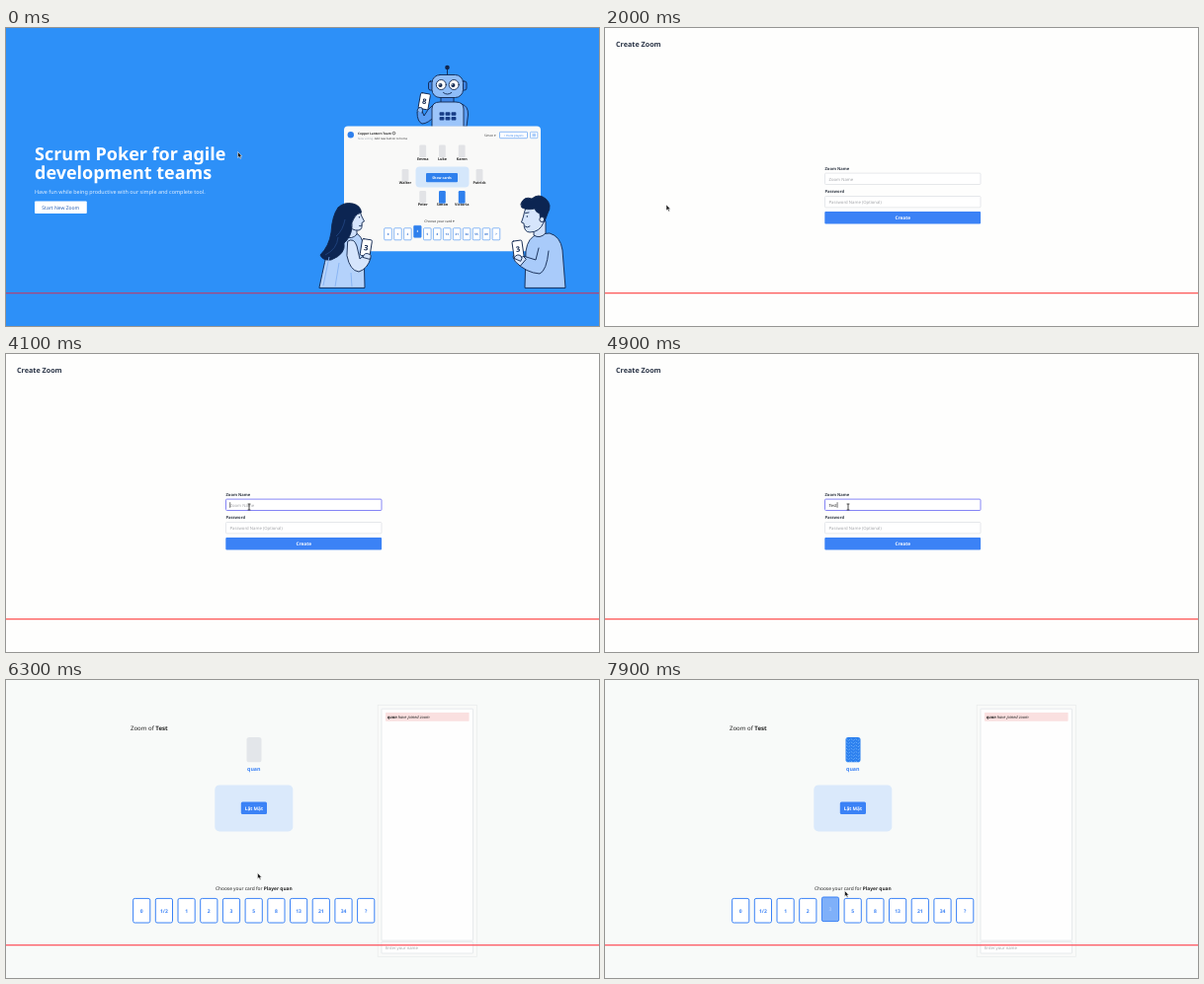
Animation of 600 by 302 pixels, one loop 8000 ms. Source, as an HTML page:

```html
<!DOCTYPE html>
<html lang="en">
<head>
<meta charset="utf-8">
<title>Scrum Poker</title>
<style>
  html, body { margin: 0; width: 100%; height: 100%; overflow: hidden; background: #fefefd; }
  svg { display: block; width: 100vw; height: 100vh; }
  text { font-family: "Noto Sans", "Open Sans", sans-serif; text-rendering: geometricPrecision; white-space: pre; }
  .b { font-weight: 700; }
  .s { font-weight: 600; }
  .m { text-anchor: middle; }
  .ink { stroke: #10264f; stroke-width: .9; stroke-linejoin: round; stroke-linecap: round; }
</style>
</head>
<body>
<svg id="stage" viewBox="0 0 600 302" preserveAspectRatio="none" xmlns="http://www.w3.org/2000/svg"></svg>
<script>
const BLUE = '#3b82f6', NAVY = '#10264f';
const LOOP = 8000, STEP = 100;

const rect = (x, y, w, h, r, fill, more = '') =>
  `<rect x="${x}" y="${y}" width="${w}" height="${h}" rx="${r}" fill="${fill}" ${more}/>`;
const text = (x, y, size, fill, str, cls = '', more = '') =>
  `<text x="${x}" y="${y}" font-size="${size}" fill="${fill}" class="${cls}" ${more}>${str}</text>`;
const path = (d, fill, cls = 'ink', more = '') => `<path d="${d}" fill="${fill}" class="${cls}" ${more}/>`;
const circle = (x, y, r, fill, cls = '') => `<circle cx="${x}" cy="${y}" r="${r}" fill="${fill}" class="${cls}"/>`;
const line = (color) => rect(0, 268, 600, 1.3, 0, color);

// Landing page
function robot() {
  const pads = [0, 1, 2].map(i =>
    rect(438.6 + i * 6, 85.2, 4.8, 3.6, .8, '#173c86') + rect(438.6 + i * 6, 90, 4.8, 3.6, .8, '#173c86')).join('');
  return path('M446.5 48V42', 'none') + circle(446.5, 40, 2.3, NAVY) +
    path('M461 77Q468 79 467.5 88L466 100H458Z', '#5a9df3') +
    path('M432 78Q426 83 423 89L420.5 83L416 85Q416 95 421 97Q427 97 434 89Z', '#5a9df3') +
    rect(440, 68, 13, 8, 1, '#3f86e6', 'class="ink"') +
    path('M431 100V82Q431 75 439 75H455Q463 75 463 82V100Z', '#9cc5fa') + pads +
    rect(427.5, 54, 5, 9, 2, '#3f86e6', 'class="ink"') + rect(461, 54, 5, 9, 2, '#3f86e6', 'class="ink"') +
    rect(431, 47.5, 31.5, 23, 8, '#8fbdf8', 'class="ink"') +
    [440.3, 453.2].map(x => circle(x, 57.5, 5, '#fff', 'ink') + circle(x - .8, 58, 2, NAVY) + circle(x - 1.4, 57.2, .6, '#fff')).join('') +
    path('M442.5 65.5Q446.5 68.8 450.8 65.5', 'none') +
    card(423.3, 74.2, 10, 16, 10, '8') + path('M416 84Q417 79 421 81Q422 83 421 86', '#8fbdf8');
}

const card = (x, y, w, h, turn, label) =>
  `<g transform="translate(${x} ${y}) rotate(${turn})">` +
  rect(-w / 2, -h / 2, w, h, 1.4, '#fff', 'class="ink"') + text(0, 2.7, 7.5, NAVY, label, 'b m') + '</g>';

function woman() {
  return path('M317 263Q323 234 327 219Q331 208 342 207H352Q361 210 362 222L363 263Z', '#b4d2fb') +
    path('M343 202L343 211Q350 215 355 209V200Z', '#cfe0fb') +
    path('M350 183Q359 184 359.5 190L362.5 196L360 197.5Q361 204 357 205Q350 206 346 199Z', '#d6e5fc') +
    path('M336 182Q342 176 351 178Q359 180 359.5 187Q354 188 352 193Q349 197 350 202Q349 212 342 218Q344 229 329 235Q320 236 318 230Q327 221 329 207Q330 190 336 182Z', '#0c2552') +
    path('M334 211Q341 205 343 194M323 230Q335 224 336 212', 'none', '', 'stroke="#2c5598" stroke-width=".6"') +
    circle(357.5, 191.7, .7, NAVY) + path('M357.5 200.5Q359 201.2 360 200', 'none') +
    path('M346 216Q352 212 355 221L358 234L365 228L369 233Q366 244 357 247Q348 246 345 231Z', '#d6e5fc') +
    path('M327 232L321 261M337 238L333 262M349 248L350 262', 'none', '', 'stroke="#7eaef2" stroke-width=".8"') +
    card(364.3, 222.6, 10, 17, 9, '3') + path('M361 232Q363 227 367 229Q371 230 368 234Z', '#d6e5fc');
}

function man() {
  return path('M525 263L526 226Q528 212 538 209L550 208Q561 211 563 225L566 263Z', '#a9cbfa') +
    path('M534 198V210Q540 214 546 208V196Z', '#cfe0fb') +
    path('M526 182Q524 188 523.5 191L521.5 197L524 198Q524 207 530 207Q540 207 544 197L545 180L533 177Z', '#d6e5fc') +
    path('M521 178Q524 170 532 173Q539 167 546 173Q553 179 548 188L545 196L541 196L540 188Q536 187 535 183Q527 185 522 182Z', '#0c2552') +
    circle(542.3, 194, 2.5, '#d6e5fc', 'ink') + circle(527.3, 191, .75, NAVY) +
    path('M525.5 187.6L529 187M525 201Q527.5 203 530 201', 'none') +
    path('M549 226Q547 246 540 249Q526 248 516 237L520 230L536 235L539 223', '#a9cbfa') +
    path('M526 234L520 228Q514 227 513 232Q514 237 520 241Z', '#d6e5fc') +
    card(518, 224, 10, 17, -8, '3') + path('M514 233Q517 228 521 231Q523 233 521 236Z', '#d6e5fc');
}

function board() {
  const seats = [
    [421.7, 118.5, 'Emma'], [441.4, 118.5, 'Luke'], [461.2, 118.5, 'Karen'],
    [404, 143, 'Walter'], [479, 143, 'Patrick'],
    [421.7, 165, 'Peter'], [441.4, 165, 'Simon', 1], [461.2, 165, 'Victoria', 1]];
  const hand = ['0', '1', '2', '3', '5', '8', '13', '21', '34', '55', '89', '?'];
  return rect(342, 99.5, 199, 126.7, 4, '#f9f9f8') + circle(348.8, 108.2, 3.2, '#2f80ed') +
    text(356, 107.8, 3.15, '#222', 'Copper Lantern Team', 'b') +
    `<circle cx="392.5" cy="106.6" r="1.3" fill="none" stroke="#333" stroke-width=".7"/>` +
    text(356, 112.6, 2.85, '#333', '<tspan fill="#9ba3ad">Now voting:</tspan> Add new button to home') +
    text(484, 109.6, 3.1, '#333', 'Simon ▾') +
    rect(499.5, 105.3, 28, 6.4, .8, '#fff', 'stroke="#3b8af0" stroke-width=".6"') +
    text(513.5, 109.5, 2.8, '#2f80ed', '+ Invite players', 'm') +
    rect(530.5, 105.3, 7.3, 6.4, .8, '#fff', 'stroke="#3b8af0" stroke-width=".5"') +
    path('M532.5 107.2H536M532.5 108.5H536M532.5 109.8H536', 'none', '', 'stroke="#3b8af0" stroke-width=".5"') +
    rect(414.5, 140.5, 54, 21, 4, '#d5e7fb') + rect(425, 147, 32, 9.2, 1, '#2f80ed') +
    text(441, 152.9, 3.5, '#fff', 'Show cards', 'b m') +
    seats.map(([x, y, name, voted]) => rect(x - 3.4, y, 6.8, 12.8, 1.2, voted ? '#2f80ed' : '#e2e3e6') +
      text(x, y + 15.3, 3.7, '#222', name, 's m')).join('') +
    text(438.5, 197, 3.4, '#333', 'Choose your card ▾', 'm') +
    hand.map((n, i) => {
      const on = i === 3, x = 386.5 + i * 9.95, y = on ? 200.3 : 202.8;
      return rect(x - 3.8, y, 7.6, 12, .9, on ? '#2f80ed' : '#fff', 'stroke="#3b8af0" stroke-width=".6"') +
        text(x, y + 7.1, 3, on ? '#fff' : '#2f6fd0', n, 's m');
    }).join('');
}

const landing = rect(0, 0, 600, 302, 0, '#2d90f8') +
  text(29, 134.3, 18, '#fff', 'Scrum Poker for agile', 'b') +
  text(29, 153.3, 18, '#fff', 'development teams', 'b') +
  text(29, 168.2, 5.45, '#e4f0fe', 'Have fun while being productive with our simple and complete tool.') +
  rect(29, 175.5, 52.8, 12.5, 1, '#fff', 'id="start"') +
  text(55.3, 183.5, 5, '#2b62b5', 'Start New Zoom', 'm') +
  robot() + board() + woman() + man() + line('#a8487e');

// Form page
const field = (id, y) => rect(222.5, y, 157.5, 11.4, 1, '#fff', `id="${id}" stroke="#dcdee2" stroke-width=".7"`);
const form = rect(0, 0, 600, 302, 0, '#fefefd') +
  text(11, 19.4, 7.2, '#2a3446', 'Create Zoom', 'b') +
  text(222.5, 144.1, 4.1, '#333b48', 'Zoom Name', 's') + field('name', 147.1) +
  text(226.5, 154.5, 4.25, '#a3a5a9', 'Zoom Name', '', 'id="hint"') +
  text(226.5, 154.5, 4.25, '#222', '', '', 'id="typed"') +
  rect(226.5, 150.2, .6, 5.6, 0, '#222', 'id="caret"') +
  text(222.5, 167.4, 4.1, '#333b48', 'Password', 's') + field('pass', 170.5) +
  text(226.5, 177.9, 4.25, '#a3a5a9', 'Password Name (Optional)') +
  rect(222.3, 186, 157.8, 12.5, 1, BLUE, 'id="create"') +
  text(301.2, 194, 4.75, '#fff', 'Create', 'b m') + line('#fd5a5a');

// Room page
const deck = ['0', '1/2', '1', '2', '3', '5', '8', '13', '21', '34', '?'];
let zigzag = '';
for (let i = 0; i < 8; i++) zigzag += `M244 ${59.5 + i * 3.2}l2.4 2l2.4 -2l2.4 2l2.4 -2l2.4 2l2.4 -2`;

const room = rect(0, 0, 600, 302, 0, '#f8faf9') +
  text(126, 50.5, 6.05, '#222', 'Zoom of <tspan class="b">Test</tspan>') +
  rect(243.5, 58, 15, 25.3, 2.6, '#e3e6ea', 'id="seat"') +
  `<clipPath id="clip">${rect(243.5, 58, 15, 25.3, 2.6, '#000')}</clipPath>` +
  path(zigzag, 'none', '', 'id="back" clip-path="url(#clip)" stroke="#74b4fb" stroke-width=".8" stroke-dasharray="2.2 .9"') +
  text(250.8, 92, 5.3, BLUE, 'quan', 'b m') +
  rect(211.3, 106.4, 79, 47, 4.5, '#dae9fb') + rect(237.8, 123.5, 26.2, 12.6, 1.5, BLUE) +
  text(250.9, 131.6, 4.75, '#fff', 'Lật Mặt', 'b m') +
  text(250.8, 212.7, 4.85, '#222', 'Choose your card for <tspan class="b">Player quan</tspan>', 'm') +
  deck.map((n, i) => {
    const x = 137.2 + i * 22.7;
    return `<g id="card${i}">` + rect(x - 8.6, 221.4, 17.2, 24.6, 1.7, '#fff', `stroke="${BLUE}" stroke-width="1"`) +
      text(x, 235.6, 5, BLUE, n, 'b m') + '</g>';
  }).join('') +
  rect(376.2, 25.3, 100.3, 255, 0, '#f9faf9', 'stroke="#e9ebec" stroke-width=".7"') +
  rect(380, 29.2, 92.5, 234.8, .5, '#fefefe', 'stroke="#dfe2e5" stroke-width=".7"') +
  rect(384, 33, 84.6, 8.7, .6, '#fae0e0') +
  text(385.8, 39, 4.1, '#222', '<tspan class="b">quan</tspan> have joined zoom', '', 'font-style="italic"') +
  rect(380, 265.3, 92.5, 11.7, .5, '#fefefe', 'stroke="#dfe2e5" stroke-width=".7"') +
  text(384, 272.6, 4.2, '#a3a5a9', 'Enter your name') + line('#fd5a64');

const pointers = {
  arrow: path('M0 0V6L1.4 4.8L2.5 7L3.5 6.5L2.5 4.4H4.3Z', '#1c1c1c', '', 'stroke="#fff" stroke-width=".5"'),
  hand: path('M-.6 0Q.4 -.7 1 .3V2.2Q2.6 1.8 4.2 3V5Q3.8 6.6 3 7H0Q-1.6 5.4 -2 3.6Q-1.4 3 -.6 4Z', '#fff', '', 'stroke="#1c1c1c" stroke-width=".7"'),
  beam: path('M-1.4 -3H1.4M0 -3V3M-1.4 3H1.4', 'none', '', 'stroke="#222" stroke-width=".8"')
};

const wrap = (id, body) => `<g id="${id}">${body}</g>`;
document.getElementById('stage').innerHTML = wrap('landing', landing) + wrap('form', form) + wrap('room', room) +
  wrap('cursor', Object.keys(pointers).map(k => wrap(k, pointers[k])).join(''));

const $ = id => document.getElementById(id);
const show = (id, on) => $(id).setAttribute('display', on ? 'inline' : 'none');
const set = (el, key, value) => el.setAttribute(key, value);

// time, x, y of the pointer's hot spot
const track = [
  [0, 234.5, 125.5], [800, 62.5, 177.8], [1900, 62.5, 177.8], [2000, 62, 179], [2800, 246, 155],
  [5300, 246, 155], [5400, 244.5, 160], [5600, 244.5, 160], [5800, 252.5, 193.6], [6200, 252.5, 193.6],
  [6300, 254.5, 195.5], [6600, 254.5, 195.5], [7050, 283, 142], [7500, 233.2, 225.8],
  [7800, 233.2, 225.8], [7900, 242.5, 213.5], [8000, 242.5, 213.5]];

function pointAt(t) {
  const i = Math.max(1, track.findIndex(p => p[0] >= t));
  const [t0, x0, y0] = track[i - 1], [t1, x1, y1] = track[i];
  const k = (t - t0) / (t1 - t0), e = k * k * (3 - 2 * k);
  return [x0 + (x1 - x0) * e, y0 + (y1 - y0) * e];
}

const inside = (x, y, l, t, r, b) => x >= l && x <= r && y >= t && y <= b;
const during = (t, ...spans) => spans.some(([a, b]) => t >= a && t < b);
const keys = [4300, 4500, 4700, 4900];

function draw(now) {
  const t = Math.floor((now % LOOP) / STEP) * STEP;
  const [x, y] = pointAt(t);
  const page = t < 2000 ? 'landing' : t < 6300 ? 'form' : 'room';
  for (const p of ['landing', 'form', 'room']) show(p, p === page);

  let kind = 'arrow';
  if (page === 'landing') {
    const over = inside(x, y, 29, 175, 82, 188);
    set($('start'), 'fill', over ? '#e1e3e6' : '#fff');
    if (over) kind = 'hand';
  } else if (page === 'form') {
    if (inside(x, y, 222, 147, 380, 161)) kind = 'beam';
    if (inside(x, y, 222, 186, 380, 199)) kind = 'hand';
    const focus = during(t, [2900, 6000]);
    set($('name'), 'stroke', focus ? '#8585f5' : '#dcdee2');
    set($('name'), 'stroke-width', focus ? 1 : .7);
    set($('create'), 'fill', t >= 6000 ? '#3577ea' : BLUE);
    const count = keys.filter(k => t >= k).length;
    $('typed').textContent = 'Test'.slice(0, count);
    show('hint', !count);
    show('caret', during(t, [2900, 3500], [4100, 5400], [5900, 6000]));
    set($('caret'), 'x', 226.5 + (count ? $('typed').getComputedTextLength() + .2 : 0));
  } else {
    if (inside(x, y, 219, 221, 237, 246)) kind = 'hand';
    const voted = t >= 7900, [box, label] = $('card4').children;
    set(box, 'fill', t < 7600 ? '#fff' : t < 7700 ? '#bdd6fc' : '#7fb0f9');
    set(label, 'fill', t < 7600 ? BLUE : '#a9c9fb');
    set($('card4'), 'transform', `translate(0 ${voted ? -1.4 : 0})`);
    set($('seat'), 'fill', voted ? '#2b7fee' : '#e3e6ea');
    show('back', voted);
  }
  for (const k in pointers) show(k, k === kind);
  set($('cursor'), 'transform', `translate(${x.toFixed(2)} ${y.toFixed(2)})`);
}

const start = performance.now();
function tick() {
  draw(performance.now() - start);
  requestAnimationFrame(tick);
}
tick();
</script>
</body>
</html>
```
